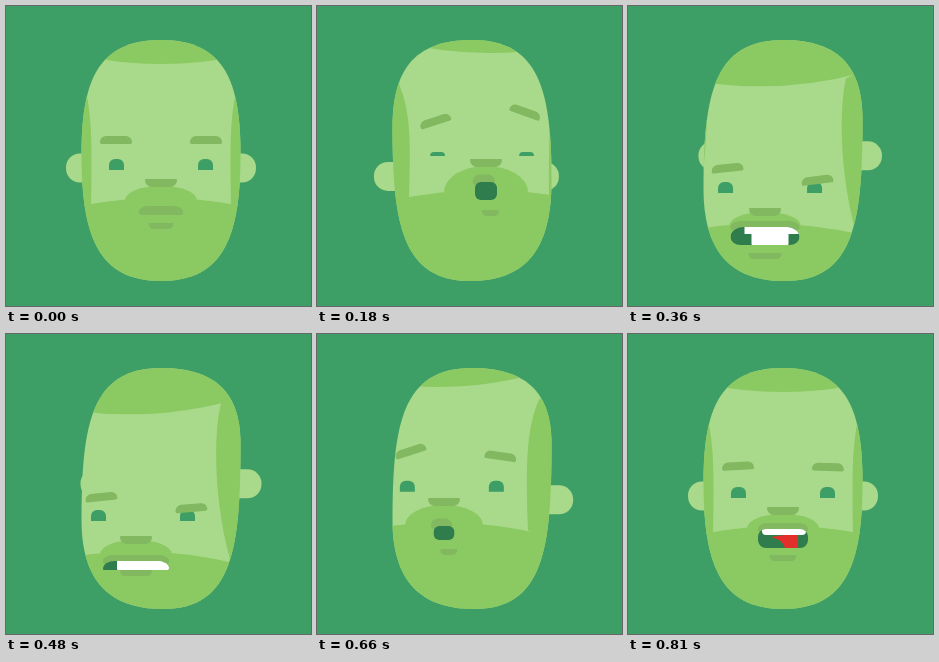
These frames come from a looping animation (305 by 300 pixels, 840 ms). An HTML page with a canvas:

```html
<!DOCTYPE html>
<html lang="en">
<head>
<meta charset="utf-8">
<title>Talking head</title>
<style>
html, body { margin: 0; width: 100%; height: 100%; overflow: hidden; background: #3d9f65; }
canvas { display: block; }
</style>
</head>
<body>
<canvas id="stage" width="305" height="300"></canvas>
<script>
const ctx = document.getElementById('stage').getContext('2d');
const LOOP = 840, STEP = 30, MID = 155;
const BG = '#3d9f65', SKIN = '#a9d98a', HAIR = '#8bc962', SHADE = '#81b860',
      MOUTH = '#2f7d4d', WHITE = '#ffffff', RED = '#e22f2c';

// time, turn, nod, eye height, brow heights and tilts (left, right),
// mouth width, height and top, gap to the lower lip
const FIELDS = ['turn', 'nod', 'eye', 'browL', 'tiltL', 'browR', 'tiltR',
                'mouthW', 'mouthH', 'mouthY', 'gap'];
const KEYS = [
  [0,     0,   0, 11, 134,   0, 134,  0, 44,  0, 206, 11],
  [180,  14, -20,  4, 115, -18, 106, 20, 22, 18, 176, 10],
  [360, -18,  29, 11, 162,  -6, 174, -7, 69, 18, 221,  8],
  [480, -25,  29, 11, 163,  -6, 174, -5, 66,  9, 227,  0],
  [600, -28,   4,  8, 131, -10, 139,  3, 63, 18, 202,  7],
  [660, -28,  -9, 11, 117, -18, 122,  8, 21, 14, 192,  9],
  [810,   0,   0, 11, 132,  -3, 133,  2, 50, 19, 195,  7]
];
KEYS.push([LOOP, ...KEYS[0].slice(1)]);

// Monotone slope: flat at extremes, harmonic mean elsewhere
function slope(i, col) {
  if (i === 0 || i === KEYS.length - 1) return 0;
  const rate = j => (KEYS[j + 1][col] - KEYS[j][col]) / (KEYS[j + 1][0] - KEYS[j][0]);
  const a = rate(i - 1), b = rate(i);
  return a * b <= 0 ? 0 : 2 * a * b / (a + b);
}

function poseAt(time) {
  let i = 0;
  while (time >= KEYS[i + 1][0]) i++;
  const from = KEYS[i], to = KEYS[i + 1], span = to[0] - from[0];
  const u = (time - from[0]) / span, ease = u * u * (3 - 2 * u);
  const pose = {};
  FIELDS.forEach((name, n) => {
    const col = n + 1;
    pose[name] = from[col] + (to[col] - from[col]) * ease
      + span * u * (1 - u) * ((1 - u) * slope(i, col) - u * slope(i + 1, col));
  });
  return pose;
}

function box(color, x, y, w, h, radii) {
  ctx.fillStyle = color;
  ctx.beginPath();
  ctx.roundRect(x, y, w, h, radii);
  ctx.fill();
}

// Fills the area between a parabola and a horizontal limit
function parabola(apexX, apexY, bend, limit) {
  const x1 = 40, x2 = 270;
  const at = x => apexY + bend * (x - apexX) ** 2;
  ctx.beginPath();
  ctx.moveTo(x1, at(x1));
  ctx.quadraticCurveTo((x1 + x2) / 2, apexY + bend * (x1 - apexX) * (x2 - apexX), x2, at(x2));
  ctx.lineTo(x2, limit);
  ctx.lineTo(x1, limit);
  ctx.fill();
}

// Runs a right-hand drawing, then its mirror image with the turn reversed
function bothSides(draw, turn) {
  draw(turn);
  ctx.save();
  ctx.translate(2 * MID, 0);
  ctx.scale(-1, 1);
  draw(-turn);
  ctx.restore();
}

function headPath(turn) {
  const lean = Math.max(-1, Math.min(1, -turn / 20));
  const top = 34, bottom = 275, right = 234.5, left = 75.5;
  const chin = MID + 2 * lean;
  const ry = 148 - 38 * lean, ly = 148 + 38 * lean;
  const up = y => y - 0.63 * (y - top), down = y => y + 0.63 * (bottom - y);
  const crown = 64, jaw = 64, skew = 6 * lean;
  ctx.beginPath();
  ctx.moveTo(MID, top);
  ctx.bezierCurveTo(MID + crown - skew, top, right, up(ry), right, ry);
  ctx.bezierCurveTo(right, down(ry), chin + jaw + skew, bottom, chin, bottom);
  ctx.bezierCurveTo(chin - jaw + skew, bottom, left, down(ly), left, ly);
  ctx.bezierCurveTo(left, up(ly), MID - crown - skew, top, MID, top);
}

function drawHair(turn, nod) {
  const x = MID + turn, low = Math.max(0, nod);
  ctx.fillStyle = HAIR;
  parabola(MID + 1.3 * turn, 58 + nod * (nod > 0 ? 0.77 : 0.55), -0.0013, 0);

  const jaw = 192 + nod * (nod > 0 ? 0.88 : 0.4);
  bothSides(t => {
    const y = 85 + 0.7 * Math.min(0, t), end = jaw + 8;
    const mid = 224 + 0.55 * t - 0.1 * low;
    ctx.beginPath();
    ctx.moveTo(230 + 0.35 * t - 0.2 * nod, y);
    ctx.bezierCurveTo(mid, y + 30, mid, end - 60, 225 + 0.5 * t + 0.4 * low, end);
    ctx.lineTo(300, end + 40);
    ctx.lineTo(300, y - 40);
    ctx.fill();
  }, turn);

  parabola(x, jaw, 0.0012, 300);
  const top = 180 + nod - 0.1 * low;
  ctx.beginPath();
  ctx.ellipse(x, jaw + 2, 36 + (jaw - top - 12) / 2, jaw + 2 - top, 0, 0, 2 * Math.PI);
  ctx.fill();
}

function drawEye(x, base, h) {
  const r = Math.min(6, h);
  box(BG, x - 7.5, base - h, 15, h, [r, r, 0, 0]);
}

function drawBrow(x, y, tilt) {
  ctx.save();
  ctx.translate(x, y);
  ctx.rotate(tilt * Math.PI / 180);
  box(SHADE, -16, -4, 32, 8, [7, 7, 2, 2]);
  ctx.restore();
}

function drawMouth(p, time) {
  const x = MID + p.turn, w = p.mouthW, h = p.mouthH, y = p.mouthY;
  const left = x - w / 2, right = x + w / 2;
  const offset = Math.max(0, (40 - w) / 4);
  const lowerW = 10 + w / 3;
  box(SHADE, x + offset - lowerW / 2, y + h + p.gap, lowerW, 6, [1, 1, 6, 6]);
  const rise = 6 + offset / 3, arch = { x: 5 + w / 10, y: 7 };
  box(SHADE, left - offset / 2, y - rise, w, rise + 3, [arch, arch, 3, 3]);
  if (h < 1) return;

  const teeth = time >= 270 && time < 630, tongue = time >= 735;
  const upper = teeth ? { x: 13, y: Math.min(10, h) } : Math.min(w < 35 ? 6 : 8, h / 2);
  const lower = teeth ? { x: Math.max(1, h - 8), y: Math.max(1, h - 10) } : upper;
  ctx.save();
  ctx.beginPath();
  ctx.roundRect(left, y, w, h, [upper, upper, lower, lower]);
  ctx.clip();
  ctx.fillStyle = MOUTH;
  ctx.fillRect(left, y, w, h);
  if (teeth) {
    box(WHITE, left + 14, y, w - 14, Math.min(h, 7), 0);
    // The block widens to the full row as the jaw closes
    const open = Math.min(1, Math.max(0, (h - 9) / 5));
    box(WHITE, left + 14 + 7 * open, y, w - 14 - 18 * open, h, [0, 0, 1, 1]);
  }
  if (tongue) {
    ctx.fillStyle = RED;
    ctx.beginPath();
    ctx.moveTo(left + 13, y + 8);
    ctx.quadraticCurveTo(left + 24, y + 10, left + 27, y + h);
    ctx.lineTo(right - 10, y + h);
    ctx.lineTo(right - 10, y + 4);
    ctx.fill();
    box(WHITE, left + 4, y - 4, w - 6, 10, [0, 0, 4, 4]);
  }
  ctx.restore();
}

function draw(time) {
  const p = poseAt(time), { turn, nod } = p;
  ctx.fillStyle = BG;
  ctx.fillRect(0, 0, 305, 300);

  bothSides(t => {
    const edge = 250 - t * (t > 0 ? 0.58 : 0.22);
    box(SKIN, 215, 147.5 - 0.42 * nod, edge - 215, 29, [0, 14, 14, 0]);
  }, turn);

  ctx.save();
  headPath(turn);
  ctx.fillStyle = SKIN;
  ctx.fill();
  ctx.clip();
  drawHair(turn, nod);

  const shift = 0.72 * turn, browShift = 0.59 * turn;
  const base = 164 + nod * (nod > 0 ? 0.79 : 0.7);
  drawEye(110.5 + shift, base, p.eye);
  drawEye(199.5 + shift, base, p.eye);
  drawBrow(110 + browShift, p.browL, p.tiltL);
  drawBrow(200 + browShift, p.browR, p.tiltR);
  box(SHADE, 139 + turn, 173 + nod, 32, 8, [1, 1, 7, 7]);
  drawMouth(p, time);
  ctx.restore();
}

// Advances in steps, with two short holds
function stepped(time) {
  const t = Math.floor(time / STEP) * STEP;
  return t === 390 || t === 690 ? t - STEP : t;
}

const start = performance.now();
function tick() {
  draw(stepped((performance.now() - start) % LOOP));
  requestAnimationFrame(tick);
}
tick();
</script>
</body>
</html>
```
